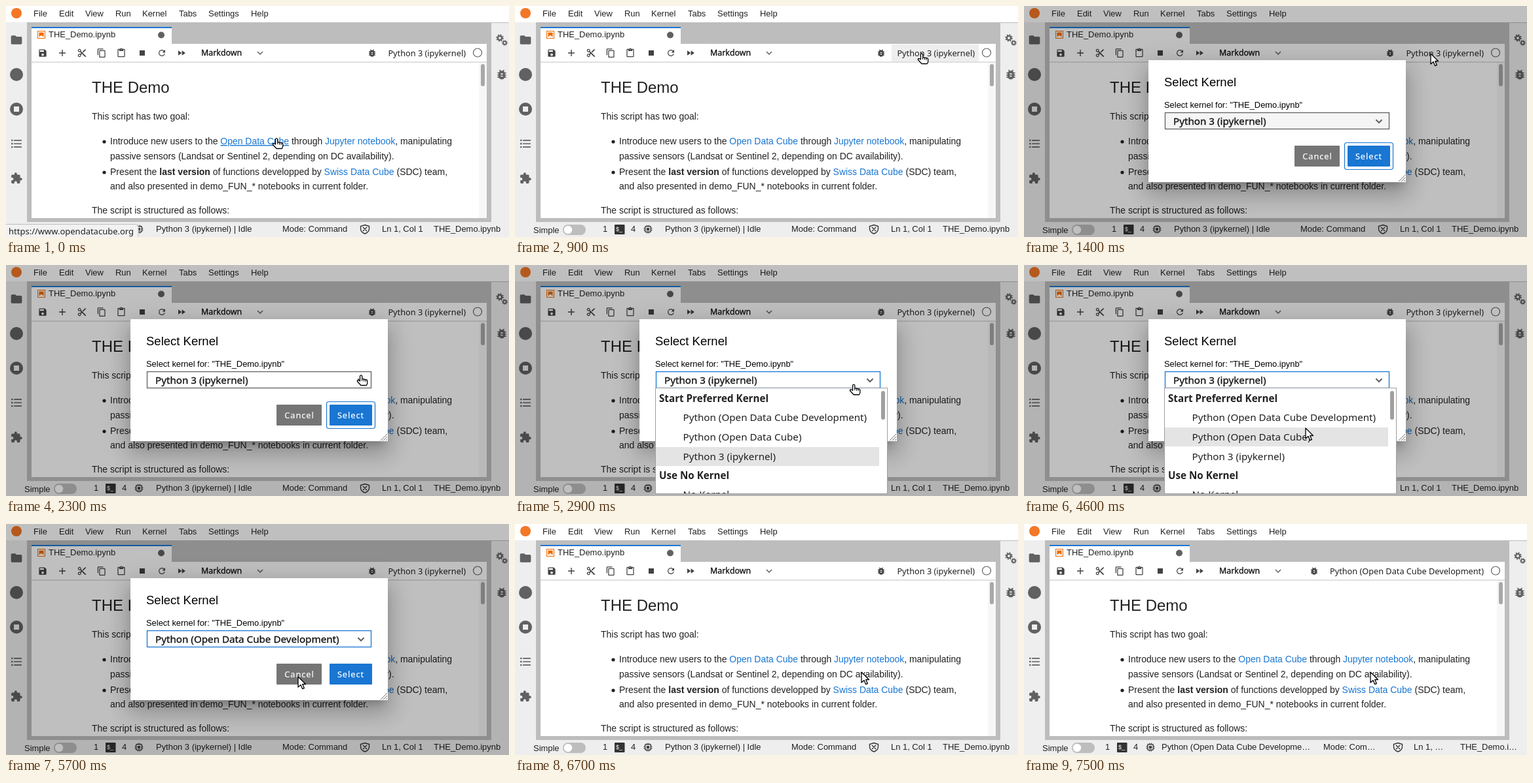
These frames come from a looping animation (768 by 354 pixels, 8.1 s). An HTML page:

```html
<!DOCTYPE html>
<html lang="en">
<head>
<meta charset="utf-8">
<title>Kernel selection</title>
<style>
html, body { margin: 0; width: 100%; height: 100%; overflow: hidden; background: #fff; }
svg { display: block; width: 768px; height: 354px; }
text { font-family: "Liberation Sans", Arial, sans-serif; fill: #212121; white-space: pre; }
.ui { font-family: "Noto Sans", "Open Sans", sans-serif; }
.black { fill: #000; }
.medium { fill: #111; stroke: #111; stroke-width: .3px; }
.button { fill: #fff; stroke: #fff; stroke-width: .2px; letter-spacing: 1px; text-anchor: middle; }
.link { fill: #1976d2; }
</style>
</head>
<body>
<svg id="stage" viewBox="0 0 768 354"></svg>
<script>
const LOOP = 8100, STEP = 100;
const BLUE = '#1976d2', GREY = '#616161', ORANGE = '#ef6c00', BORDER = '#bdbdbd';
const OLD = 'Python 3 (ipykernel)', DEV = 'Python (Open Data Cube Development)';

const text = (x, y, s, size = 12.95, attrs = '') => `<text x="${x}" y="${y}" font-size="${size}" ${attrs}>${s}</text>`;
const ui = (x, y, s, size, attrs = '', more = '') => text(x, y, s, size, `class="ui ${more}" ${attrs}`);
const body = (x, y, s) => text(x, y, s, 13.96);
const rect = (x, y, w, h, fill, attrs = '') => `<rect x="${x}" y="${y}" width="${w}" height="${h}" fill="${fill}" ${attrs}/>`;
const dot = (x, y, r, fill, attrs = '') => `<circle cx="${x}" cy="${y}" r="${r}" fill="${fill}" ${attrs}/>`;
const line = (d, color = GREY, w = 1.5) => `<path d="${d}" fill="none" stroke="${color}" stroke-width="${w}"/>`;

// Glyphs on a 24-unit grid, placed by their centre
const GLYPHS = {
  folder: 'M10 4H4C2.9 4 2 4.9 2 6v12c0 1.1.9 2 2 2h16c1.1 0 2-.9 2-2V8c0-1.1-.9-2-2-2h-8z',
  list: 'M2 4h3v3H2zM7 4.5h15v2H7zM2 10.5h3v3H2zM7 11h15v2H7zM2 17h3v3H2zM7 17.5h15v2H7z',
  puzzle: 'M20.5 11H19V7c0-1.1-.9-2-2-2h-4V3.5a2.5 2.5 0 0 0-5 0V5H4c-1.1 0-2 .9-2 2v3.8h1.5a2.7 2.7 0 0 1 0 5.4H2V20c0 1.1.9 2 2 2h3.8v-1.5a2.7 2.7 0 0 1 5.4 0V22H17c1.1 0 2-.9 2-2v-4h1.5a2.5 2.5 0 0 0 0-5z',
  bug: 'M20 8h-2.8a6 6 0 0 0-1.8-2L17 4.4 15.6 3l-2.2 2.2a6 6 0 0 0-2.8 0L8.4 3 7 4.4 8.6 6a6 6 0 0 0-1.8 2H4v2h2.1L6 12H4v2h2l.1 2H4v2h2.8a6 6 0 0 0 10.4 0H20v-2h-2.1l.1-2h2v-2h-2l-.1-2H20zM14 16h-4v-2h4zM14 12h-4v-2h4z',
  save: 'M17 3H5a2 2 0 0 0-2 2v14c0 1.1.9 2 2 2h14a2 2 0 0 0 2-2V7zM12 19a3 3 0 1 1 0-6 3 3 0 0 1 0 6zM15 9H5V5h10z',
  add: 'M19 13h-6v6h-2v-6H5v-2h6V5h2v6h6z',
  cut: 'M9.6 7.6A4 4 0 1 0 7.6 9.6L10 12l-2.4 2.4a4 4 0 1 0 2 2L12 14l7 7h3v-1zM6 8a2 2 0 1 1 0-4 2 2 0 0 1 0 4zM6 20a2 2 0 1 1 0-4 2 2 0 0 1 0 4zM19 3l-6 6 2 2 7-7V3z',
  copy: 'M16 1H4a2 2 0 0 0-2 2v14h2V3h12zM19 5H8a2 2 0 0 0-2 2v14c0 1.1.9 2 2 2h11a2 2 0 0 0 2-2V7a2 2 0 0 0-2-2zM19 21H8V7h11z',
  paste: 'M19 2h-4.2a3 3 0 0 0-5.6 0H5a2 2 0 0 0-2 2v16c0 1.1.9 2 2 2h14a2 2 0 0 0 2-2V4a2 2 0 0 0-2-2zM12 2a1 1 0 1 1 0 2 1 1 0 0 1 0-2zM19 20H5V4h2v3h10V4h2z',
  refresh: 'M17.6 6.4A8 8 0 1 0 19.7 14h-2.1A6 6 0 1 1 16.2 7.8L13 11h7V4z',
  forward: 'M4 18l8.5-6L4 6zM13 6v12l8.5-6z',
  chip: 'M9 9h6v6H9zM21 11V9h-2V7a2 2 0 0 0-2-2h-2V3h-2v2h-2V3H9v2H7a2 2 0 0 0-2 2v2H3v2h2v2H3v2h2v2c0 1.1.9 2 2 2h2v2h2v-2h2v2h2v-2h2a2 2 0 0 0 2-2v-2h2v-2h-2v-2zM17 17H7V7h10z'
};
const glyph = (name, x, y, size, color = GREY) =>
  `<path d="${GLYPHS[name]}" fill="${color}" fill-rule="evenodd" transform="translate(${x - size / 2} ${y - size / 2}) scale(${size / 24})"/>`;
const gear = (x, y, r) => dot(x, y, r * .65, 'none', `stroke="${GREY}" stroke-width="${r * .5}"`) +
  dot(x, y, r, 'none', `stroke="${GREY}" stroke-width="${r * .4}" stroke-dasharray="${r * Math.PI / 8}"`);
const chevron = (x, y, r = 4, w = 1.5) => line(`M${x - r} ${y - r / 2}l${r} ${r} ${r} ${-r}`, GREY, w);

// Each move: start time, number of steps, end point
const MOVES = [
  [200, 8, 621, 73], [1800, 6, 542, 169], [2900, 3, 446, 224], [3300, 1, 448, 229],
  [3600, 1, 426, 263], [3700, 1, 424, 271], [4000, 3, 432, 237], [4500, 2, 430, 250],
  [4700, 1, 430, 261], [5100, 2, 446, 234], [6000, 5, 529, 227]
];

function pointer(t) {
  let x = 413, y = 203;
  for (const [start, steps, toX, toY] of MOVES) {
    if (t < start) break;
    const u = Math.min(1, ((t - start) / STEP + 1) / steps), e = u * u * (3 - 2 * u);
    x += (toX - x) * e;
    y += (toY - y) * e;
  }
  return { x, y };
}

function cursor({ x, y }, hand) {
  const shape = hand
    ? 'M-1.5 9V1.5a1.6 1.6 0 0 1 3.2 0V6q1.5-1 2.8.3 1.5-.7 2.6.5 2.6-.4 2.6 2V12q0 2-1.500 3.500H0L-5.5 9.500q-.6-2 1.5-2z'
    : 'M0 0V16L4 12.5 6.7 18.7 9.3 17.6 6.7 11.5H11.5z';
  return `<g transform="translate(${x} ${y})"><path d="${shape}" fill="#fff" stroke="#000" stroke-width="1.3" stroke-linejoin="round"/>` +
    (hand ? line('M1.7 6v3M4.5 6.5v3M7.1 7v3', '#000', 1) : '') + '</g>';
}

function frame() {
  const menu = [['File', 42], ['Edit', 81], ['View', 121], ['Run', 167], ['Kernel', 208], ['Tabs', 264], ['Settings', 309], ['Help', 374]];
  return rect(0, 0, 768, 354, '#eee') + rect(0, 0, 768, 25, '#fff') +
    rect(32, 25, 709, 306, BORDER) + rect(741, 25, 27, 1, BORDER) +
    dot(16, 11, 8, '#f37726') + menu.map(([s, x]) => text(x, 16, s)).join('') +
    glyph('folder', 16, 52, 20) + dot(16, 105, 10, GREY) + dot(16, 158, 10, GREY) + rect(12, 154, 8, 8, '#eee') +
    glyph('list', 16, 211, 19) + glyph('puzzle', 16, 264, 19) +
    gear(754, 49, 4.8) + gear(761.5, 56.5, 3.6) + glyph('bug', 757, 105, 20) +
    rect(39, 32, 214, 27, '#fff') + rect(39, 32, 214, 2, BLUE) +
    rect(48.5, 38.5, 11, 11, '#fff', `stroke="${ORANGE}"`) + `<path d="M50.4 40.4h7.2v7.2L54 44.8l-3.600 2.800z" fill="${ORANGE}"/>` +
    text(65, 48, 'THE_Demo.ipynb') + dot(237, 44.5, 5, GREY);
}

function toolbar(t, p) {
  const changed = t >= 7000, hover = t < 1400 && p.y < 86 && p.x > 575;
  const icons = [['save', 56], ['add', 86], ['cut', 116], ['copy', 146], ['paste', 176], ['refresh', 238], ['forward', 268]];
  return rect(39, 58, 695, 28, '#fff') + rect(39, 85.5, 695, 1, '#c4c4c4') +
    (hover ? rect(575, 59, 133, 26, '#eee') : '') +
    icons.map(([name, x]) => glyph(name, x, 72, name === 'add' ? 17 : 15, '#424242')).join('') + rect(204, 68, 8, 8, '#424242') +
    ui(298, 76, 'Markdown', 12.4, '', 'medium') + chevron(388, 72) +
    glyph('bug', changed ? 443 : 559, 72, 15, '#424242') +
    ui(702, 76.5, changed ? DEV : OLD, 12.72, 'text-anchor="end"') +
    dot(720, 71.5, 6.5, changed && t < 7500 ? GREY : 'none', `stroke="${GREY}" stroke-width="1.2"`);
}

function notebook(t) {
  const link = (s, attrs = '') => `<tspan class="link" ${attrs}>${s}</tspan>`;
  const cube = link('Open Data Cube', t < 200 ? 'text-decoration="underline"' : '');
  return rect(39, 86.5, 695, 238.5, '#fff') + rect(722, 87, 12, 238, '#f7f7f7') + rect(725, 89, 6, 34, '#a8a8a8', 'rx="3"') +
    text(131, 133, 'THE Demo', 24) + body(131, 174, 'This script has two goal:') +
    dot(150, 208, 2.6, '#212121') + dot(150, 255, 2.6, '#212121') +
    body(159, 212, `Introduce new users to the ${cube} through ${link('Jupyter notebook')}, manipulating`) +
    body(159, 235, 'passive sensors (Landsat or Sentinel 2, depending on DC availability).') +
    body(159, 259, `Present the <tspan font-weight="bold">last version</tspan> of functions developped by ${link('Swiss Data Cube')} (SDC) team,`) +
    body(159, 281, 'and also presented in demo_FUN_* notebooks in current folder.') +
    body(131, 318, 'The script is structured as follows:');
}

function status(t) {
  // Left group offset, then [x, label] of each item and the shield's x
  const [dx, kernel, mode, shield, pos, file] =
    t < 7000 ? [0, [229, OLD + ' | Idle'], [422, 'Mode: Command'], 548, [574, 'Ln 1, Col 1'], [653, 'THE_Demo.ipynb']] :
    t < 7500 ? [-30, [190, DEV + ' | …'], [463, 'Mode: Co…'], 573, [597, 'Ln 1,…'], [669, 'THE_Demo.…']] :
    [-10, [210, 'Python (Open Data Cube Developme…'], [457, 'Mode: Com…'], 571, [595, 'Ln 1, …'], [666, 'THE_Demo.i…']];
  return rect(0, 331, 768, 23, '#eee') + text(28, 347.5, 'Simple') +
    rect(73, 335, 35, 16, BORDER, 'rx="8"') + dot(81, 343, 6.2, '#fff') +
    text(134 + dx, 346, '1') + text(177 + dx, 346, '4') +
    rect(152 + dx, 335, 15.5, 15, '#333', 'rx="1"') + text(154 + dx, 345, '$_', 9, 'style="fill:#fff"') +
    glyph('chip', 203 + dx, 342, 17, '#424242') +
    [kernel, mode, pos, file].map(([x, s]) => text(x, 346, s)).join('') +
    line(`M${shield} 335.5l6.5 2v4q0 5-6.5 7.5-6.5-2.5-6.5-7.5v-4zM${shield - 3} 339l6 6m0-6l-6 6`, '#333', 1.4) +
    (t < 300 ? rect(-4, 334.5, 206, 24, '#f2f2f2', `rx="4" stroke="${BORDER}"`) + ui(4, 349.5, 'https://www.opendatacube.org', 13) : '');
}

function kernelList(p) {
  const row = p.y < 219 ? 2 : Math.floor((p.y - 219) / 30);
  return rect(214.5, 188.5, 354, 162, '#fff', 'stroke="#9e9e9e"') + rect(215, 219 + row * 30, 341, 29, '#e4e4e4') +
    rect(559, 193, 6, 44, '#a0a0a0', 'rx="3"') +
    '<svg width="568" height="350" viewBox="0 0 568 350" style="width:568px;height:350px">' +
    ui(220, 210, 'Start Preferred Kernel', 15.2, 'font-weight="bold"') +
    [DEV, 'Python (Open Data Cube)', OLD].map((s, i) => ui(256.5, 239 + 30 * i, s, 15.2)).join('') +
    ui(220, 328, 'Use No Kernel', 15.2, 'font-weight="bold"') + ui(256.5, 357, 'No Kernel', 15.2) + '</svg>';
}

// A box shadow under the dialog: vertical offset, blur, spread, opacity
const shadow = ([dy, blur, spread, alpha]) => rect(190 - spread, 83 - spread + dy, 393 + 2 * spread, 187 + 2 * spread,
  '#000', `opacity="${alpha}" style="filter:blur(${blur / 2}px)"`);

function dialog(t, p) {
  const used = t >= 2700, open = used && t < 5700, over = t >= 5800;
  const fill = t >= 2300 ? '#fff' : '#f5f5f5';
  return rect(0, 0, 768, 354, '#000', 'opacity=".25"') +
    [[10, 13, -6, .2], [20, 31, 3, .14], [8, 38, 7, .12]].map(shadow).join('') + rect(190, 83, 393, 187, '#fff') +
    line('M572 269l10-10M576 269l6-6M580 269l2-2', '#757575', 1) +
    text(214, 123, 'Select Kernel', 18.5, 'class="black"') +
    text(214, 156, 'Select kernel for: "THE_Demo.ipynb"', 12.9, 'class="black"') +
    rect(215.5, 163.5, 342, 25, fill, `stroke="${used ? BLUE : GREY}" stroke-width="1.3"`) +
    ui(228, 182, t < 5700 ? OLD : DEV, 15.2, '', 'medium') + chevron(542, 176.5, 4.6, 2) +
    (used ? '' : rect(489.5, 209.5, 74, 41, 'none', `rx="3.5" stroke="${BLUE}" stroke-width="1.2"`)) +
    rect(413, 214, 69, 32, over && p.x < 482 ? GREY : '#757575', 'rx="1"') +
    rect(494, 214, 65, 32, over && p.x >= 494 ? '#1565c0' : BLUE, 'rx="1"') +
    ui(448, 235, 'Cancel', 12.7, '', 'button') + ui(526.5, 235, 'Select', 12.7, '', 'button') +
    (open ? kernelList(p) : '');
}

function draw(t) {
  const p = pointer(t);
  const onButton = t < 1400 && p.x > 575 && p.y < 86;
  const onSelect = t >= 1800 && t < 3100 && p.x < 557 && p.y > 163 && p.y < 189;
  return frame() + toolbar(t, p) + notebook(t) + status(t) +
    (t >= 1400 && t < 6700 ? dialog(t, p) : '') +
    cursor(p, t < 200 || onButton || onSelect);
}

const stage = document.getElementById('stage');
const began = performance.now();
let shown = -1;
function tick() {
  const t = Math.floor((performance.now() - began) % LOOP / STEP) * STEP;
  if (t !== shown) stage.innerHTML = draw(shown = t);
  requestAnimationFrame(tick);
}
tick();
</script>
</body>
</html>
```
